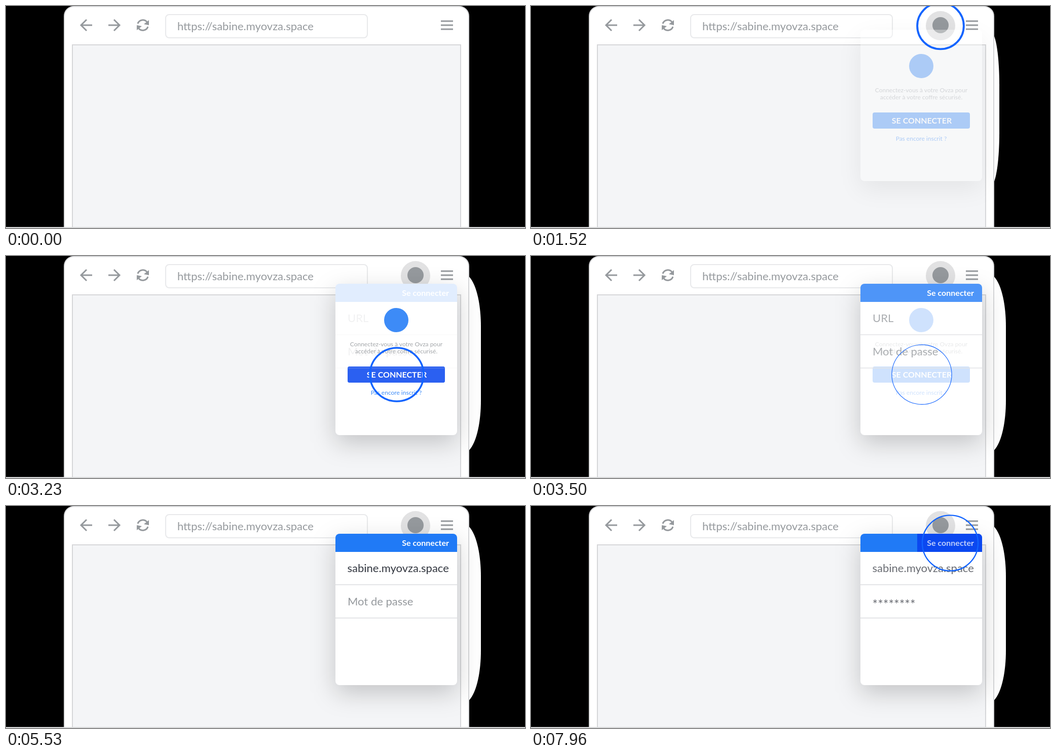
An HTML page for the animation above (7990 ms loop, 1024 by 440 pixels).

```html
<!DOCTYPE html>
<html lang="fr">
<head>
<meta charset="utf-8">
<title>Connexion</title>
<style>
  html, body { margin: 0; width: 100%; height: 100%; overflow: hidden; background: #000; }
  svg { display: block; width: 100vw; height: 100vh; }
  text { font-family: Lato, sans-serif; white-space: pre; }
  .field { font-size: 22px; fill: #95999d; }
  .typed { font-size: 22px; fill: #32363f; }
  .small { font-size: 12px; fill: #95999d; text-anchor: middle; }
  .label { font-size: 16px; font-weight: 700; fill: #fff; }
  .blue { fill: #207af6; }
  .pressed { fill: #0b48f0; }
  .icon { fill: none; stroke: #95999d; stroke-width: 3; }
</style>
</head>
<body>
<svg viewBox="0 0 1024 440">
  <defs>
    <filter id="blur" x="-50%" y="-50%" width="200%" height="200%">
      <feGaussianBlur stdDeviation="24"/>
    </filter>
    <clipPath id="panelShape"><rect x="650" y="55" width="240" height="300" rx="8"/></clipPath>
  </defs>

  <path id="halo" fill="#fff"/>

  <!-- browser window -->
  <rect x="115" y="1" width="798" height="480" rx="19" fill="#fff" stroke="#d6d7d9" stroke-width="2"/>
  <rect x="131" y="77" width="766" height="400" fill="#f4f5f7" stroke="#d6d7d9" stroke-width="2"/>
  <rect x="315" y="17" width="398" height="46" rx="7" fill="#fff" stroke="#e8e9eb" stroke-width="2"/>
  <text class="field" x="338" y="48">https://sabine.myovza.space</text>
  <g class="icon">
    <path d="M170 38H148M159 27L148 38L159 49"/>
    <path d="M202 38H224M213 27L224 38L213 49"/>
    <path d="M260 35A10.5 10.5 0 0 1 278 31.5M280 41A10.5 10.5 0 0 1 262 44.5"/>
    <path d="M858 30H882M858 38H882M858 46H882"/>
  </g>
  <path d="M282 28V38L272 36ZM258 48V38L268 40Z" fill="#95999d"/>

  <!-- toolbar button -->
  <circle id="disc" cx="808" cy="39" r="29" fill="#e2e2e3"/>
  <circle id="badge" r="16" fill="#95999d"/>

  <g id="popup">
    <rect x="650" y="71" width="240" height="300" rx="8" fill-opacity=".2" filter="url(#blur)"/>
    <rect x="650" y="55" width="240" height="300" rx="8" fill="#fff"/>
    <g id="welcome">
      <circle class="blue" cx="770" cy="127" r="24"/>
      <text class="small" x="770" y="179">Connectez-vous à votre Ovza pour</text>
      <text class="small" x="770" y="193">accéder à votre coffre sécurisé.</text>
      <rect class="blue" x="674" y="219" width="192" height="32" rx="4"/>
      <rect id="pressWelcome" class="pressed" x="674" y="219" width="192" height="32" rx="4"/>
      <text class="label" x="771" y="241" text-anchor="middle">SE CONNECTER</text>
      <text class="small blue" x="770" y="275" style="fill:#207af6">Pas encore inscrit ?</text>
    </g>
    <g id="form" clip-path="url(#panelShape)">
      <rect class="blue" x="650" y="55" width="240" height="36"/>
      <rect id="pressForm" class="pressed" x="762" y="55" width="128" height="36"/>
      <path d="M650 156H890M650 222H890" stroke="#e4e5e7" stroke-width="2"/>
      <text id="urlHint" class="field" x="674" y="131">URL</text>
      <text id="passHint" class="field" x="674" y="197">Mot de passe</text>
      <g id="entries">
        <text class="label" x="874" y="79" text-anchor="end">Se connecter</text>
        <text id="url" class="typed" x="673.5" y="131"></text>
        <text id="pass" class="typed" x="673.5" y="204" style="font-size:25px"></text>
      </g>
    </g>
  </g>

  <circle id="ring" fill="none" stroke="#1264ff"/>
  <rect y="438" width="1024" height="2" fill="#d9dadb"/>
</svg>
<script>
const LOOP = 7990;
const ADDRESS = "sabine.myovza.space";
const PASSWORD = "********";
const RING_TIME = 1100;
const CLICKS = [
  { start: 1100, x: 808, y: 39.5 },
  { start: 2670, x: 771, y: 235 },
  { start: 7340, x: 827, y: 73.5 }
];
const RING_WIDTH = [[0, 4], [.5, 3.8], [.57, 2.2], [.68, 1.2], [1, .8]];

const el = Object.fromEntries(
  [...document.querySelectorAll("svg [id]")].map(node => [node.id, node]));

const ramp = (t, from, to) => Math.min(1, Math.max(0, (t - from) / (to - from)));
const easeOut = p => 1 - (1 - p) ** 3;

function track(points, t) {
  const i = Math.max(1, points.findIndex(([time]) => time >= t));
  const [t0, v0] = points[i - 1], [t1, v1] = points[i];
  return v0 + (v1 - v0) * ramp(t, t0, t1);
}

function set(node, attrs) {
  for (const name in attrs) node.setAttribute(name, attrs[name]);
}

const fade = (node, opacity) => set(node, { opacity });

function type(node, hint, text, t, start, step) {
  const count = Math.max(0, Math.floor((t - start) / step) + 1);
  node.textContent = text.slice(0, count);
  fade(hint, count ? 0 : 1);
}

// White glow edge visible beyond the right side of the window
function drawHalo(shown) {
  const right = 914 + 23 * shown ** .75;
  const middle = 199 + 14 * shown;
  const half = 133 + 40 * shown;
  const top = middle - half, bottom = middle + half;
  const bend = 913 + (right - 913) * .7;
  set(el.halo, {
    opacity: shown > 0 ? 1 : 0,
    d: `M913 ${top}C${bend} ${top + 18} ${right} ${top + 60} ${right} ${top + 100}` +
       `V${bottom - 100}C${right} ${bottom - 60} ${bend} ${bottom - 18} 913 ${bottom}Z`
  });
}

function drawRing(t) {
  const click = CLICKS.find(c => t >= c.start && t < c.start + RING_TIME);
  if (!click) return fade(el.ring, 0);
  const p = (t - click.start) / RING_TIME;
  set(el.ring, {
    cx: click.x,
    cy: click.y,
    r: 60 * easeOut(p),
    "stroke-width": track(RING_WIDTH, p),
    opacity: 1 - ramp(p, .8, 1)
  });
}

function render(t) {
  const pop = easeOut(ramp(t, 70, 540));
  set(el.badge, {
    transform: `translate(808 38) scale(${1.9 - .9 * pop})`,
    opacity: pop
  });
  fade(el.disc, ramp(t, 1110, 1250));

  const shown = ramp(t, 1385, 1795);
  set(el.popup, { opacity: shown, transform: `translate(0 ${-12 * (1 - shown)})` });
  drawHalo(shown);

  const swap = ramp(t, 3177, 3587);
  fade(el.welcome, 1 - swap);
  fade(el.form, swap);
  fade(el.pressWelcome, ramp(t, 2680, 2800) - ramp(t, 3250, 3470));
  fade(el.pressForm, ramp(t, 7370, 7500));
  fade(el.entries, 1 - ramp(t, 7850, 8260));

  type(el.url, el.urlHint, ADDRESS, t, 4420, 61.6);
  type(el.pass, el.passHint, PASSWORD, t, 6080, 70);
  drawRing(t);
}

function tick() {
  render(performance.now() % LOOP);
  requestAnimationFrame(tick);
}
tick();
</script>
</body>
</html>
```
